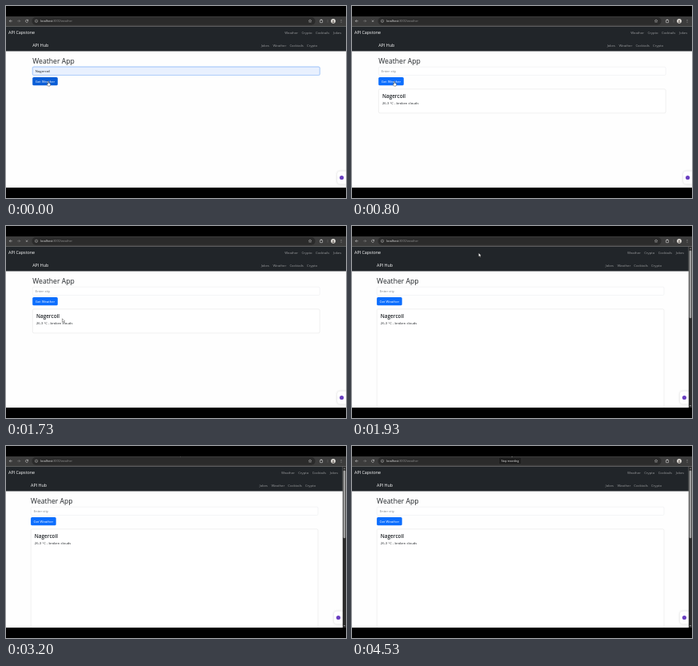
Write an HTML page with a canvas that moves like this. It is 426 px wide and 240 px high and loops after 4590 ms.

```html
<!DOCTYPE html>
<html lang="en">
<head>
<meta charset="utf-8">
<title>Weather App</title>
<style>
  html, body { margin: 0; width: 100%; height: 100%; overflow: hidden; background: #000; }
  canvas { display: block; width: 100vw; height: 100vh; }
</style>
</head>
<body>
<canvas id="stage"></canvas>
<script>
const W = 426, H = 240, LOOP = 4590;
const TOP = 13, BOTTOM = 227;
const CLEARED = 730, GROWN = 1930;
const canvas = document.getElementById('stage');
const ctx = canvas.getContext('2d');

const clamp = v => Math.max(0, Math.min(1, v));
const span = (t, a, b) => clamp((t - a) / (b - a));
const mix = (a, b, p) => a + (b - a) * p;
const smooth = p => p * p * (3 - 2 * p);

// Cursor hot spot: [time, x, y]
const path = [
  [0, 53, 94.3], [1530, 53, 94.3], [1730, 70.5, 115.8], [1800, 76, 112],
  [2000, 190, 4], [2930, 190, 4], [3130, 214, 8], [3400, 228, 8.6],
  [3930, 228, 8.6], [4130, 198.5, 8.6], [LOOP, 198.5, 8.6]
];

function cursorAt(t) {
  const i = Math.max(1, path.findIndex(p => p[0] > t));
  const [a, b] = [path[i - 1], path[i]];
  const p = smooth(span(t, a[0], b[0]));
  return [mix(a[1], b[1], p), mix(a[2], b[2], p)];
}

function rect(x, y, w, h, color) {
  ctx.fillStyle = color;
  ctx.fillRect(x, y, w, h);
}

function box(x, y, w, h, r, fill, stroke, line = 0.35) {
  ctx.beginPath();
  ctx.roundRect(x, y, w, h, r);
  if (fill) { ctx.fillStyle = fill; ctx.fill(); }
  if (stroke) { ctx.strokeStyle = stroke; ctx.lineWidth = line; ctx.stroke(); }
}

function disc(x, y, r, color) {
  ctx.fillStyle = color;
  ctx.beginPath();
  ctx.arc(x, y, r, 0, 7);
  ctx.fill();
}

function lines(color, width, ...strokes) {
  ctx.strokeStyle = color;
  ctx.lineWidth = width;
  ctx.beginPath();
  for (const s of strokes) {
    ctx.moveTo(s[0], s[1]);
    for (let i = 2; i < s.length; i += 2) ctx.lineTo(s[i], s[i + 1]);
  }
  ctx.stroke();
}

function shape(points, fill, stroke) {
  ctx.beginPath();
  for (let i = 0; i < points.length; i += 2) ctx.lineTo(points[i], points[i + 1]);
  ctx.closePath();
  ctx.fillStyle = fill;
  ctx.fill();
  if (stroke) { ctx.strokeStyle = stroke; ctx.lineWidth = 0.4; ctx.stroke(); }
}

// Drawn large and scaled down so small sizes keep exact spacing
function text(str, x, y, size, color, weight = 400, align = 'left') {
  ctx.save();
  ctx.translate(x, y);
  ctx.scale(0.1, 0.1);
  ctx.font = `${weight} ${size * 10}px "Open Sans", "Noto Sans", sans-serif`;
  ctx.textAlign = align;
  ctx.fillStyle = color;
  ctx.fillText(str, 0, 0);
  const width = ctx.measureText(str).width / 10;
  ctx.restore();
  return width;
}

function arrow(x, y, dir, color) {
  const tip = x + 1.7 * dir;
  lines(color, 0.55, [x - 1.7 * dir, y, tip, y],
    [tip - 1.5 * dir, y - 1.5, tip, y, tip - 1.5 * dir, y + 1.5]);
}

function star(x, y, r) {
  ctx.beginPath();
  for (let i = 0; i < 10; i++) {
    const a = i * Math.PI / 5 - Math.PI / 2, d = i % 2 ? r * 0.45 : r;
    ctx.lineTo(x + d * Math.cos(a), y + d * Math.sin(a));
  }
  ctx.closePath();
  ctx.strokeStyle = '#c8c8c8';
  ctx.lineWidth = 0.45;
  ctx.stroke();
}

function toolbar(loading) {
  const y = 18.8, ink = '#d6d6d6';
  rect(0, TOP, W, 12.6, '#3c3c3c');
  box(32.5, 14.1, 355, 9.6, 4.8, '#2b2b2b');
  arrow(6, y, -1, ink);
  arrow(16, y, 1, '#8c8c8c');
  if (loading) {
    lines(ink, 0.5, [24.9, y - 1.2, 27.3, y + 1.2], [27.3, y - 1.2, 24.9, y + 1.2]);
  } else {
    ctx.beginPath();
    ctx.arc(26.1, y, 1.6, 0.4, 5.6);
    ctx.strokeStyle = ink;
    ctx.lineWidth = 0.55;
    ctx.stroke();
    shape([28, y - 2, 28, y - 0.2, 26.2, y - 0.2], ink);
  }
  ctx.beginPath();
  ctx.arc(38, y, 1.7, 0, 7);
  ctx.strokeStyle = '#c4c4c4';
  ctx.lineWidth = 0.45;
  ctx.stroke();
  lines('#c4c4c4', 0.5, [38, y - 0.2, 38, y + 1], [38, y - 1, 38, y - 0.6]);
  const host = text('localhost:', 43, 20.2, 3.65, '#e8e8e8');
  text('3000/weather', 43 + host, 20.2, 3.65, '#929292');
  star(381, y, 2);
  box(393.4, y - 1.3, 3.2, 3.2, 0.4, null, ink, 0.6);
  disc(395, y - 1.5, 0.75, ink);
  lines('#777', 0.4, [403, y - 2, 403, y + 2]);
  disc(410, y, 2.9, '#e4e1dc');
  disc(410, y - 0.4, 0.9, '#77706a');
  box(408.6, y + 0.6, 2.8, 1.5, 0.7, '#77706a');
  for (let i = -1; i < 2; i++) disc(420, y + i * 1.4, 0.42, ink);
}

function navbars(gutter) {
  const link = '#9b9d9f', half = gutter / 2;
  rect(0, 25.5, W - gutter, 31, '#212529');
  text('API Capstone', 3, 35.4, 5.35, '#fff');
  const main = [['Weather', 349.3], ['Crypto', 370.4], ['Cocktails', 387.9], ['Jokes', 410]];
  const hub = [['Jokes', 319.7], ['Weather', 334.5], ['Cocktails', 355.4], ['Crypto', 377]];
  for (const [label, x] of main) text(label, x - gutter, 35.1, 4.22, link);
  text('API Hub', 33.2 - half, 51, 5.35, '#fff');
  for (const [label, x] of hub) text(label, x - half, 50.7, 4.22, link);
}

function form(x, t) {
  const filled = t < CLEARED;
  text('Weather App', x, 72.1, 8.65, '#212529', 500);
  const focus = 1 - span(t, 30, 180);
  if (filled && focus > 0) {
    ctx.globalAlpha = focus;
    box(x - 0.4, 75.6, 360.8, 11.5, 2, '#b6d4fe');
    ctx.globalAlpha = 1;
  }
  box(x + 0.15, 76.2, 359.7, 10.3, 1.5, filled ? '#e8f0fe' : '#fff', '#dee2e6');
  if (filled && focus > 0) {
    ctx.globalAlpha = focus;
    box(x + 0.15, 76.2, 359.7, 10.3, 1.5, null, '#86b7fe', 0.5);
    ctx.globalAlpha = 1;
  }
  if (filled) text('Nagercoil', x + 3.6, 83, 4.22, '#212529');
  else text('Enter city', x + 3.6, 83, 4.22, '#777e84');
  const blue = !filled ? '#0d6efd' : t < 70 ? '#0b5ed7' : '#0a58ca';
  box(x, 88.9, 31.6, 10.4, 1.6, blue);
  text('Get Weather', x + 15.8, 95.7, 4.2, '#fff', 400, 'center');
}

function card(x, grown) {
  box(x + 0.15, 103.9, 359.7, grown ? 160 : 29.9, 1.6, '#fff', '#d2d3d4');
  text('Nagercoil', x + 4.7, 114.9, 6.4, '#212529', 600);
  text('26.3 °C - broken clouds', x + 4.7, 123.4, 4.25, '#212529');
}

function badge(gutter) {
  const right = W - gutter;
  ctx.save();
  ctx.shadowColor = 'rgba(0,0,0,.18)';
  ctx.shadowBlur = 3;
  box(right - 11, 206.5, 14, 16, 4, '#fff');
  ctx.restore();
  disc(right - 5.4, 214.5, 2.6, '#6a3fc0');
}

function scrollbar() {
  rect(421.8, 25.5, 4.2, BOTTOM - 25.5, '#2c2c2c');
  shape([422.9, 28.8, 425.1, 28.8, 424, 27.3], '#9f9f9f');
  shape([422.9, 224, 425.1, 224, 424, 225.5], '#9f9f9f');
  box(422.6, 30.5, 2.7, 84.8, 1.3, '#9f9f9f');
}

function tooltip(label, cx, w, alpha) {
  if (alpha <= 0) return;
  ctx.globalAlpha = alpha;
  box(cx - w / 2, 14.2, w, 8.6, 1.2, '#1e1e1e', '#4a4a4a', 0.3);
  text(label, cx, 19.7, 3.25, '#f2f2f2', 400, 'center');
  ctx.globalAlpha = 1;
}

function cursor(t) {
  const [x, y] = cursorAt(t);
  ctx.save();
  ctx.translate(x, y);
  if (t < 1560) {
    shape([-0.5, 0, 0.4, 0, 0.6, 2, 2.6, 2.6, 2.7, 4.2, 2, 5.8, -0.4, 5.8,
      -2, 3.6, -1.6, 3, -0.6, 3.7], '#fff', '#222');
  } else {
    shape([0, 0, 0, 4.6, 1.1, 3.7, 1.9, 5.4, 2.7, 5, 1.9, 3.4, 3.3, 3.3], '#fff', '#222');
  }
  ctx.restore();
}

function draw(t) {
  const grown = t >= GROWN, gutter = grown ? 4.2 : 0;
  const left = 33.2 - gutter / 2;
  rect(0, 0, W, H, '#000');
  ctx.save();
  ctx.beginPath();
  ctx.rect(0, TOP, W, BOTTOM - TOP);
  ctx.clip();
  rect(0, TOP, W, BOTTOM - TOP, '#fefefe');
  navbars(gutter);
  form(left, t);
  if (t >= CLEARED) card(left, grown);
  badge(gutter);
  if (grown) scrollbar();
  toolbar(t >= CLEARED && !grown);
  const hint = span(t, 3660, 3860) * (1 - span(t, 3930, 4060));
  tooltip('Turn on microphone', 221, 37, hint);
  tooltip('Stop recording', 198, 28, span(t, 4130, 4330));
  cursor(t);
  ctx.restore();
}

function frame(now) {
  const scale = window.devicePixelRatio || 1;
  const w = Math.round(innerWidth * scale), h = Math.round(innerHeight * scale);
  if (canvas.width !== w || canvas.height !== h) {
    canvas.width = w;
    canvas.height = h;
  }
  ctx.setTransform(w / W, 0, 0, h / H, 0, 0);
  draw((now - start) % LOOP);
  requestAnimationFrame(frame);
}

const start = performance.now();
draw(0);
requestAnimationFrame(now => frame(Math.max(now, start)));
</script>
</body>
</html>
```
